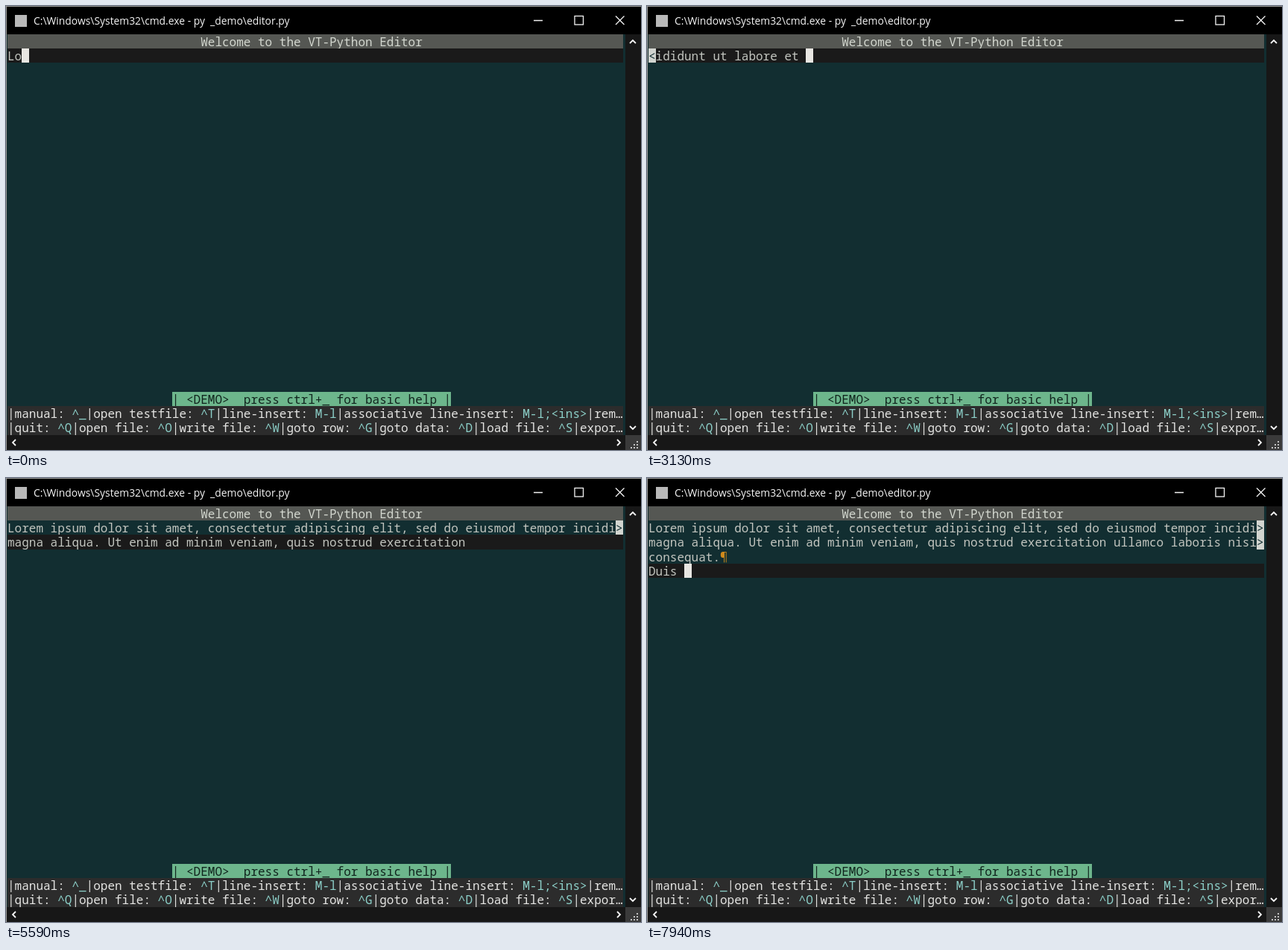
Write an HTML page with a canvas that moves like this. It is 852x596 px and loops after 8000 ms.

```html
<!DOCTYPE html>
<html lang="en">
<head>
<meta charset="utf-8">
<title>Terminal editor</title>
<style>
  html, body { margin: 0; width: 100%; height: 100%; overflow: hidden; background: #000; }
  canvas { display: block; }
</style>
</head>
<body>
<canvas id="stage" width="852" height="596"></canvas>
<script>
const ctx = document.getElementById('stage').getContext('2d');
const COLS = 86, CELL_W = 9.6, CELL_H = 19.2, LEFT = 2, TOP = 38;
const MONO = '16px "Noto Sans Mono", "DejaVu Sans Mono", monospace';
const UI = '13.86px "Open Sans", "Noto Sans", sans-serif';
const C = {
  teal: '#122e31', bar: '#1a1a1a', text: '#c2c5bf', head: '#555753', headText: '#d3d7cf',
  help: '#2c2c2c', helpText: '#e4e4e2', key: '#8ccfc8', green: '#6db68c', ink: '#10241d',
  mark: '#d2d5d0', cursor: '#e8e6e2', pilcrow: '#d08a1c', scroll: '#171717', edge: '#9a9a98',
  icon: '#f4f4f4'
};

// All times in ms. A new line opens shortly before its first key.
const LOOP = 8000, REFRESH = 62.5, KEY = 30.9, ENTER = 230, LEAD = 190;
const BLINK = 1060, BLINK_ON = 562, BLINK_SHIFT = 547;
const SCROLL_BY = 81;

const LINES = [
  'Lorem ipsum dolor sit amet, consectetur adipiscing elit, sed do eiusmod tempor incididunt ut labore et dolore ',
  'magna aliqua. Ut enim ad minim veniam, quis nostrud exercitation ullamco laboris nisi ut aliquip ex ea commodo ',
  'consequat.',
  'Duis '
].map(text => ({ text }));

// Typing is already two characters in when the loop begins.
let clock = -2 * KEY;
for (const line of LINES) {
  line.start = clock;
  clock += line.text.length * KEY + ENTER;
}

// Key bindings are wrapped in backticks.
const HELP = [
  '|manual: `^_`|open testfile: `^T`|line-insert: `M-l`|associative line-insert: `M-l;<ins>`|rem…',
  '|quit: `^Q`|open file: `^O`|write file: `^W`|goto row: `^G`|goto data: `^D`|load file: `^S`|expor…'
];

const cellX = col => LEFT + col * CELL_W;
const rowY = row => Math.round(TOP + row * CELL_H);

function rect(x, y, w, h, color) {
  ctx.fillStyle = color;
  ctx.fillRect(x, y, w, h);
}

function fillCells(row, col, count, color) {
  const x = Math.round(cellX(col)), y = rowY(row);
  rect(x, y, Math.round(cellX(col + count)) - x, rowY(row + 1) - y, color);
}

function print(row, col, text, color) {
  ctx.font = MONO;
  ctx.fillStyle = color;
  [...text].forEach((ch, i) => {
    if (ch !== ' ') ctx.fillText(ch, cellX(col + i), rowY(row) + 16);
  });
}

function stroke(width, ...paths) {
  ctx.strokeStyle = C.icon;
  ctx.lineWidth = width;
  ctx.beginPath();
  for (const [first, ...rest] of paths) {
    ctx.moveTo(...first);
    rest.forEach(p => ctx.lineTo(...p));
  }
  ctx.stroke();
}

function chevron(x, y, dx, dy) {
  const arm = s => [x - dx * 2 + dy * 4 * s, y - dy * 2 + dx * 4 * s];
  stroke(1.8, [arm(-1), [x + dx * 2, y + dy * 2], arm(1)]);
}

function drawWindow() {
  rect(0, 0, 852, 596, C.teal);
  rect(0, 0, 852, 38, '#000');
  rect(12, 12, 16, 16, '#b9b9b9');
  ctx.font = UI;
  ctx.fillStyle = C.icon;
  ctx.fillText('C:\\Windows\\System32\\cmd.exe - py  _demo\\editor.py', 37, 25);

  stroke(1.3, [[708, 19.5], [720, 19.5]], [[818, 13.5], [829.5, 25]], [[829.5, 13.5], [818, 25]]);
  ctx.strokeRect(763, 13.5, 11.5, 11.5);

  rect(831, 38, 21, 538, C.scroll);
  rect(0, 576, 831, 20, C.scroll);
  rect(831, 576, 21, 20, '#3a3a3a');
  chevron(841, 48, 0, -1);
  chevron(841, 566, 0, 1);
  chevron(11, 586, -1, 0);
  chevron(822, 586, 1, 0);
  for (let i = 0; i < 3; i++)
    for (let j = 2 - i; j < 3; j++) rect(838 + j * 4, 584 + i * 4, 2, 2, '#c4c4c4');
}

function drawPanels() {
  fillCells(0, 0, COLS, C.head);
  print(0, 27, 'Welcome to the VT-Python Editor', C.headText);
  fillCells(25, 23, 39, C.green);
  print(25, 23, '| <DEMO>  press ctrl+_ for basic help |', C.ink);
  HELP.forEach((line, i) => {
    fillCells(26 + i, 0, COLS, C.help);
    let col = 0;
    line.split('`').forEach((part, k) => {
      print(26 + i, col, part, k % 2 ? C.key : C.helpText);
      col += part.length;
    });
  });
}

function drawMarker(row, col, ch) {
  fillCells(row, col, 1, C.mark);
  print(row, col, ch, C.teal);
}

function drawFinished({ text }, row) {
  print(row, 0, text.slice(0, COLS - 1), C.text);
  if (text.length >= COLS) drawMarker(row, COLS - 1, '>');
  else print(row, text.length, '¶', C.pilcrow);
}

function drawActive({ text, start }, row, time) {
  const typed = Math.max(0, Math.min(text.length, Math.floor((time - start) / KEY + 0.01)));
  const offset = typed >= COLS ? SCROLL_BY : 0;
  if (typed) fillCells(row, 0, COLS, C.bar);
  print(row, 0, text.slice(offset, typed), C.text);
  if (offset) drawMarker(row, 0, '<');
  if ((time + BLINK_SHIFT) % BLINK < BLINK_ON) fillCells(row, typed - offset, 1, C.cursor);
}

// The screen refreshes in even steps and stalls for one extra step every three seconds.
function refreshTime(time) {
  const step = Math.floor(time / REFRESH);
  return (step % 48 === 20 ? step - 1 : step) * REFRESH;
}

function draw(now) {
  const time = refreshTime(now % LOOP);
  drawWindow();
  drawPanels();
  const open = LINES.filter(line => line.start - LEAD <= time);
  open.forEach((line, i) => {
    if (i < open.length - 1) drawFinished(line, i + 1);
    else drawActive(line, i + 1, time);
  });
  rect(0, 0, 852, 1, C.edge);
  rect(0, 0, 1, 596, C.edge);
}

let origin;
function tick(now) {
  origin ??= now;
  draw(now - origin);
  requestAnimationFrame(tick);
}
draw(0);
requestAnimationFrame(tick);
</script>
</body>
</html>
```
